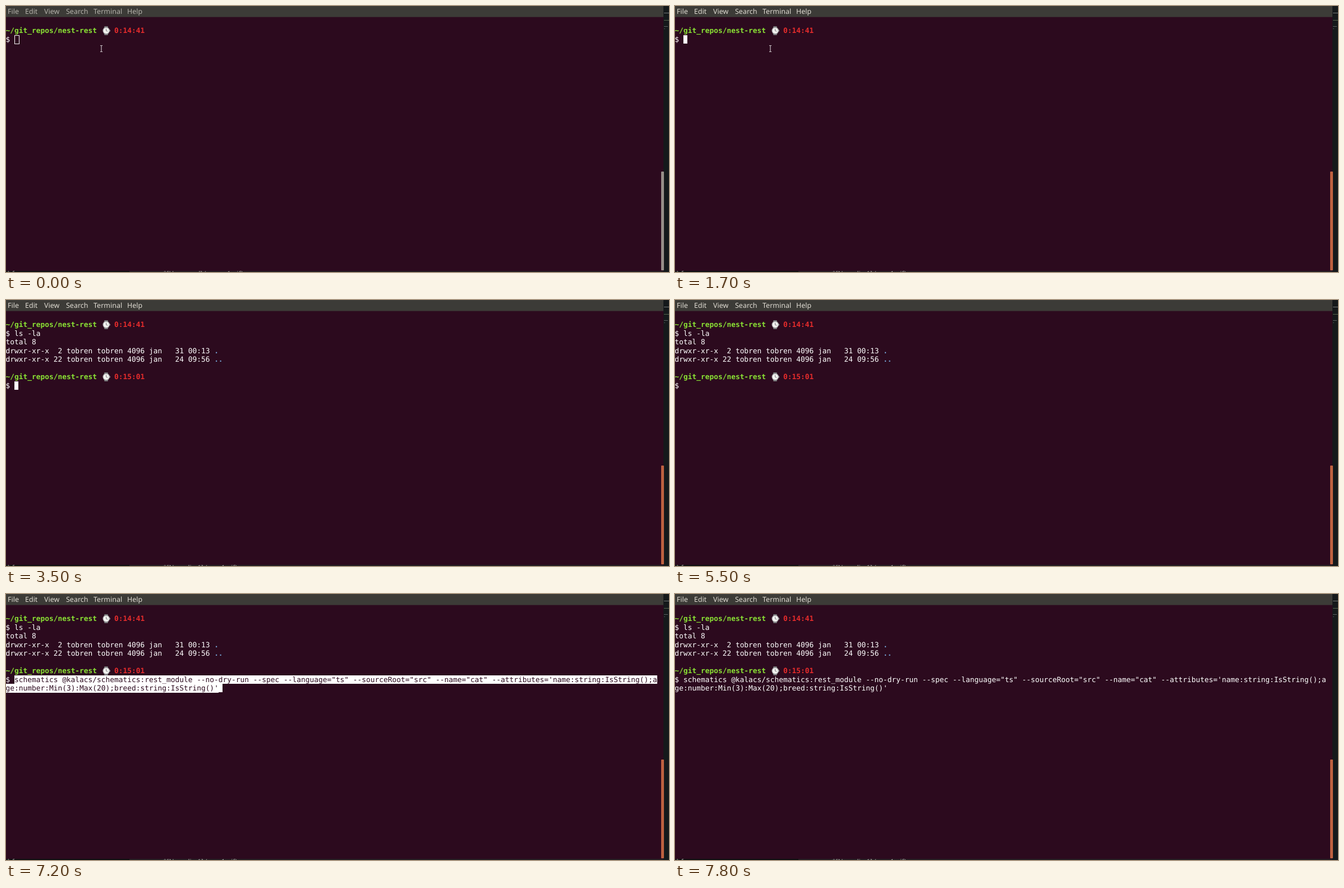
An HTML page for the animation above (8000 ms loop, 1182 by 474 pixels).

```html
<!DOCTYPE html>
<html lang="en">
<head>
<meta charset="utf-8">
<title>Terminal session</title>
<style>
  :root { --w: 7.742px; --h: 15.5px; }
  html, body { margin: 0; width: 100%; height: 100%; overflow: hidden; background: #2c0a1e; }
  body { position: relative; text-rendering: geometricPrecision; }
  body * { animation: 8s step-end infinite; }
  .abs, .menu span, .row, .cursor { position: absolute; }

  .menu { position: absolute; left: 0; top: 0; width: 1172px; height: 20px; background: #3c3b37;
    box-shadow: inset 0 -1px #37292f;
    font: 12.5px/20px "Noto Sans", "Open Sans", sans-serif; color: #b4b1aa; animation-name: menu; }
  .edge { left: 1172px; top: 0; width: 10px; height: 474px; background: #15191b; }
  .edge i { position: absolute; height: 1px; }
  .bar { left: 1168px; top: 295px; width: 5px; height: 176px; border-radius: 1px;
    background: #978e88; animation-name: bar; }
  .foot { left: 0; top: 472px; width: 1172px; height: 2px; overflow: hidden;
    background: linear-gradient(90deg, #0e0f10 220px, #251f23 220px);
    font: 12px/14px "Noto Sans", sans-serif; color: #aaa7a2; white-space: pre; }
  .foot span { position: absolute; top: -2px; }
  .blur { animation-name: blur; }
  .focus { opacity: 0; animation-name: focus; }

  .term { left: -.5px; top: 36.3px; font: 12.86px/15.5px "DejaVu Sans Mono", monospace; color: #fff; }
  /* the taller line sets the glyphs lower in their cell */
  .row { left: calc(var(--c, 0) * var(--w)); top: calc(var(--r) * var(--h));
    height: var(--h); line-height: 17.9px; white-space: pre; }
  .row b { color: #8ae234; }
  .row b + svg + b { position: absolute; left: calc(25 * var(--w)); color: #e62c2c; }
  .row svg { position: absolute; left: calc(22 * var(--w)); top: 0; width: 17px; height: 16px; }
  .row em { font-style: normal; font-weight: bold; color: #729fcf; }
  .cursor { left: calc(2 * var(--w)); top: var(--h); width: 7.5px; height: var(--h); }
  .block { background: #fff; opacity: 0; animation-name: cursor; }
  .hollow { box-sizing: border-box; width: 9px; height: 16px; border: 1px solid #fff; animation-name: blur; }
  .typed { overflow: hidden; width: 0; animation-name: type; }
  .output { opacity: 0; animation-name: output; }
  .pasted { color: transparent; animation-name: paste; }
  .quote { animation-name: quote; }
  .mouse { left: 166px; top: 69px; animation-name: mouse; }

  @keyframes menu { 7.5% { color: #cac6be; } 8.75%, 100% { color: #dfdbd2; } }
  @keyframes bar { 7.5% { background: #aa7763; } 8.75%, 100% { background: #be6140; } }
  @keyframes blur { 7.5%, 100% { opacity: 0; } }
  @keyframes focus { 7.5%, 100% { opacity: 1; } }
  @keyframes mouse { 25%, 100% { opacity: 0; } }
  @keyframes type {
    23.75% { width: var(--w); }
    26.25% { width: calc(2 * var(--w)); }
    30% { width: calc(4 * var(--w)); }
    35% { width: calc(5 * var(--w)); }
    37.5%, 100% { width: calc(6 * var(--w)); }
  }
  @keyframes output { 43.75%, 100% { opacity: 1; } }
  @keyframes paste {
    75% { color: #2c0a1e; background: #fff; }
    93.75%, 100% { color: #fff; background: transparent; }
  }
  @keyframes quote {
    75% { color: #2c0a1e; }
    97.5%, 100% { color: #fff; }
  }
  @keyframes cursor {
    0% { opacity: 0; left: calc(2 * var(--w)); top: var(--h); }
    7.5% { opacity: 1; }
    13.75% { opacity: 0; }
    21.25% { opacity: 1; }
    23.75% { left: calc(3 * var(--w)); }
    26.25% { left: calc(4 * var(--w)); }
    30% { left: calc(6 * var(--w)); }
    35% { left: calc(7 * var(--w)); }
    37.5% { left: calc(8 * var(--w)); }
    43.75% { left: calc(2 * var(--w)); top: calc(7 * var(--h)); }
    47.5% { opacity: 0; }
    55% { opacity: 1; }
    68.75% { opacity: 0; }
    75% { left: calc(49 * var(--w)); top: calc(8 * var(--h)); }
    81.25% { opacity: 1; }
    83.75% { opacity: 0; }
    90% { opacity: 1; }
    93.75% { left: calc(48 * var(--w)); }
    97.5%, 100% { opacity: 0; left: calc(48 * var(--w)); top: calc(8 * var(--h)); }
  }
</style>
</head>
<body>
<svg width="0" height="0" style="position:absolute">
  <symbol id="watch" viewBox="0 0 17 16">
    <path d="M5.5 0h6l1 4h-8zM4.5 12h8l-1 4h-6z" fill="#77777a"/>
    <rect x="14" y="6.5" width="2" height="3" rx=".8" fill="#9a9a9c"/>
    <circle cx="8.7" cy="8" r="6.2" fill="#a9a9ab"/>
    <circle cx="8.7" cy="8" r="5" fill="#f3f3f1"/>
    <path d="M8.7 4.5v3.700l2.5 1" fill="none" stroke="#66666a" stroke-width=".9"/>
  </symbol>
</svg>

<div class="menu">
  <span style="left:3px">File</span>
  <span style="left:34px">Edit</span>
  <span style="left:68px">View</span>
  <span style="left:107px">Search</span>
  <span style="left:156px">Terminal</span>
  <span style="left:216px">Help</span>
</div>
<div class="abs edge">
  <i style="left:1px;top:12px;width:9px;background:#777b7b"></i>
  <i style="left:1px;top:25px;width:9px;background:#56654f"></i>
  <i style="left:1px;top:36px;width:7px;background:#5c6163"></i>
  <i style="left:1px;top:40px;width:2px;background:#484d4f"></i>
</div>
<div class="abs foot">
  <span style="left:1px">* f</span>
  <span class="blur" style="left:280px">*[Unnamed] (screen1.gif)</span>
  <span class="focus" style="left:280px">*[New clip 1] (area1.gif)</span>
</div>
<div class="abs bar"></div>

<div class="abs term">
  <div class="cursor hollow"></div>
  <div class="cursor block"></div>
  <div class="row" style="--r:0"><b>~/git_repos/nest-rest</b><svg><use href="#watch"/></svg><b>0:14:41</b></div>
  <div class="row" style="--r:1">$</div>
  <div class="row typed" style="--r:1;--c:2">ls -la</div>
  <div class="output">
    <div class="row" style="--r:2">total 8</div>
    <div class="row" style="--r:3">drwxr-xr-x  2 tobren tobren 4096 jan   31 00:13 <em>.</em></div>
    <div class="row" style="--r:4">drwxr-xr-x 22 tobren tobren 4096 jan   24 09:56 <em>..</em></div>
    <div class="row" style="--r:6"><b>~/git_repos/nest-rest</b><svg><use href="#watch"/></svg><b>0:15:01</b></div>
    <div class="row" style="--r:7">$</div>
  </div>
  <div class="row pasted" style="--r:7;--c:2">schematics @kalacs/schematics:rest_module --no-dry-run --spec --language="ts" --sourceRoot="src" --name="cat" --attributes='name:string:IsString();a</div>
  <div class="row pasted" style="--r:8">ge:number:Min(3):Max(20);breed:string:IsString()<span class="quote">'</span></div>
</div>

<svg class="abs mouse" width="8" height="14" fill="none" stroke="#e8e4e6">
  <path d="M2 1.5h1.5l.5 .5l.5-.5h1.5M4 2v10M2 12.5h1.5l.5-.5l.5 .5h1.5"/>
</svg>
</body>
</html>
```
